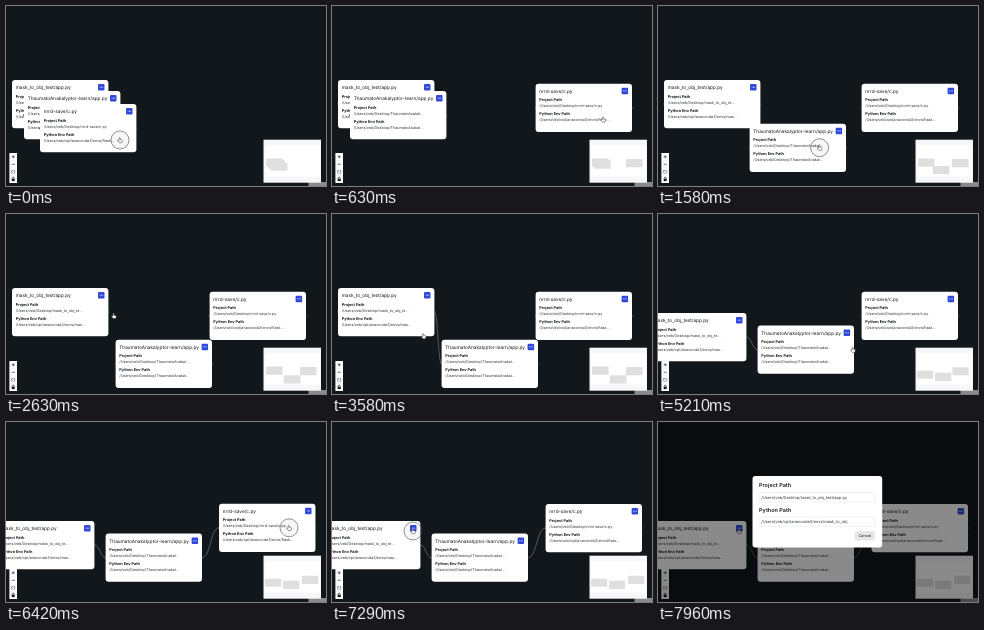
Recreate the animation shown at these times as an HTML page. Size 320x180 px, loop 8000 ms.

```html
<!DOCTYPE html>
<html lang="en">
<head>
<meta charset="utf-8">
<title>Flow editor</title>
<style>
  html, body { margin: 0; width: 100%; height: 100%; overflow: hidden; background: #11171a; }
  svg { display: block; width: 100%; height: 100%; }
  text { font-family: Inter, sans-serif; fill: #15181c; text-rendering: geometricPrecision; }
  .title { font-size: 4.75px; }
  .label { font-size: 3.85px; font-weight: 700; }
  .path { font-size: 3.75px; fill: #33373c; }
  .heading { font-size: 5.5px; font-weight: 600; }
  .edge { fill: none; stroke: #a5a8ad; stroke-width: .45; }
  .handle { fill: #1a192b; stroke: #8b8e93; stroke-width: .25; }
  .input { fill: #fff; stroke: #d8dbe0; stroke-width: .4; }
  .icon { fill: none; stroke: #15181c; stroke-width: .6; }
</style>
</head>
<body>
<svg viewBox="0 0 320 180">
  <rect width="320" height="180" fill="#11171a"/>
  <g id="edges"></g>
  <g id="cards"></g>

  <g transform="translate(3.4 147)">
    <rect width="7.6" height="30" fill="#fefefe"/>
    <path d="M0 7.5h7.6M0 15h7.6M0 22.5h7.6" stroke="#ddd" stroke-width=".3"/>
    <path class="icon" d="M2.2 3.8h3.2M3.8 2.2v3.2M2.2 11.3h3.2"/>
    <path class="icon" stroke-dasharray="1.2 .8" d="M2.2 17.5h3.2v2.6h-3.2z"/>
    <path class="icon" d="M2.8 26v-1a1 1 0 0 1 2 0v1"/>
    <rect x="2.3" y="25.8" width="3" height="2.3" fill="#15181c"/>
  </g>

  <rect x="257.5" y="133.7" width="57.5" height="43" fill="#f7f7f7"/>
  <rect x="259" y="139.6" width="55" height="31" fill="#fff"/>
  <g id="minimap" fill="#dfdfdf"></g>
  <rect x="302.5" y="176" width="17.5" height="4" fill="#fff" opacity=".5"/>
  <text x="303.5" y="179.2" font-size="3" style="fill:#888">React Flow</text>

  <g id="cursor">
    <circle id="ring" r="9" fill="#000" fill-opacity=".03" stroke="#45494d" stroke-width=".6"/>
    <path d="M-.9 -2.2q.6-.7 1.1 0v1.7l1.7.4q.7.2.5 1l-.5 1.8h-2.7l-1.5-2q-.3-.8.5-.6l.9.5z"
          fill="#fff" stroke="#222" stroke-width=".45"/>
  </g>

  <g id="modal">
    <rect id="shade" width="320" height="180" fill="#000"/>
    <g id="dialog">
      <rect x="94.5" y="54" width="129.7" height="71.5" rx="3" fill="#fff"/>
      <g id="fields"></g>
      <rect x="196.7" y="109" width="20.3" height="9.5" rx="1.3" fill="#e6e7e9"/>
      <text x="206.8" y="115.1" font-size="3.8" text-anchor="middle">Cancel</text>
    </g>
  </g>
</svg>
<script>
const LOOP = 8000, CARD_W = 96.4, CARD_H = 48.2;
const INPUT = [0, CARD_H / 2], OUTPUT = [CARD_W, CARD_H / 2], BUTTON = [89, 10], GRIP = [70, 24];

const el = id => document.getElementById(id);
const add = ([x, y], [dx, dy]) => [x + dx, y + dy];
const mix = (a, b, p) => a.map((v, i) => v + (b[i] - v) * p);
// Eased progress of t from start to end
const progress = (t, start, end) => {
  const p = Math.max(0, Math.min(1, (t - start) / (end - start)));
  return p * p * (3 - 2 * p);
};

const cards = [
  ['mask_to_obj_test/app.py', 'Desktop/mask_to_obj_te...', 'opt/anaconda3/envs/mas...'],
  ['ThaumatoAnakalyptor-learn/app.py', 'Desktop/ThaumatoAnakal...', 'Desktop/ThaumatoAnakal...'],
  ['nrrd-save/c.py', 'Desktop/nrrd-save/c.py', 'opt/anaconda3/envs/flask...']
];
const homes = cards.map((_, i) => [6 + 10 * i + 2 * i * i, 74 + 10 * i + i * i]);

// Each gesture presses at `down` and releases at `up`; the pointer glides between gestures.
const resting = [...homes];
function drag(start, end, card, to, grip = GRIP) {
  const from = resting[card];
  resting[card] = to;
  return { start, end, card, to, down: add(from, grip), up: add(to, grip) };
}
const link = (start, end, source, target) => ({
  start, end, source, target,
  down: add(resting[source], OUTPUT), up: add(resting[target], INPUT)
});
function click(start, end, card, spot) {
  const point = add(resting[card], spot);
  return { start, end, down: point, up: point };
}

const gestures = [
  drag(0, 540, 2, [203.6, 77.7], [80, 36]),
  drag(1130, 1760, 1, [109.6, 125.7]),
  link(2800, 3450, 0, 1),
  drag(3700, 4190, 0, [-8, 99]),
  drag(4550, 4930, 1, [99.6, 111.6]),
  link(5250, 5700, 1, 2),
  drag(5950, 6500, 2, [213.6, 82]),
  click(7230, 7480, 0, BUTTON)
];
const links = gestures.filter(g => 'source' in g);

const input = (y, value) => `
  <rect class="input" x="101" y="${y}" width="116" height="9.5" rx="1.3"/>
  <text class="path" x="103.3" y="${y + 6.1}" style="font-size:4px">/Users/veb/${value}</text>`;
el('fields').innerHTML = `
  <text class="heading" x="101" y="65.2">Project Path</text>
  ${input(70.5, 'Desktop/mask_to_obj_test/app.py')}
  <text class="heading" x="101" y="89.7">Python Path</text>
  ${input(95, 'opt/anaconda3/envs/mask_to_obj')}`;

el('cards').innerHTML = cards.map(([title, project, python]) => `<g>
  <circle class="handle" cy="${CARD_H / 2}" r=".9"/>
  <circle class="handle" cx="${CARD_W}" cy="${CARD_H / 2}" r=".9"/>
  <rect width="${CARD_W}" height="${CARD_H}" rx="3" fill="#fff"/>
  <text class="title" x="3.7" y="9.4">${title}</text>
  <rect x="86" y="4" width="6.5" height="6.5" rx="1" fill="#3049d9"/>
  <path d="M87.7 7.2h3.4" stroke="#fff" stroke-width=".8" stroke-dasharray=".8 .5"/>
  <text class="label" x="3.7" y="17.7">Project Path</text>
  <text class="path" x="3.7" y="23.7">/Users/veb/${project}</text>
  <text class="label" x="3.7" y="31.7">Python Env Path</text>
  <text class="path" x="3.7" y="37.7">/Users/veb/${python}</text>
</g>`).join('');
el('minimap').innerHTML = '<rect/>'.repeat(cards.length);
el('edges').innerHTML = '<path class="edge"/>'.repeat(links.length);

const cardAt = (card, t) => gestures.filter(g => g.card === card)
  .reduce((spot, g) => mix(spot, g.to, progress(t, g.start, g.end)), homes[card]);

function pointerAt(t) {
  const i = gestures.findLastIndex(g => g.start <= t);
  const { start, end, down, up } = gestures[i], next = gestures[i + 1];
  if (t < end) return mix(down, up, progress(t, start, end));
  return next ? mix(up, next.down, progress(t, end, next.start)) : up;
}

function drawMinimap(spots) {
  const left = Math.min(0, ...spots.map(s => s[0]));
  const scale = 55 / (320 - left);
  spots.forEach(([x, y], i) => {
    const box = { x: 259 + (x - left) * scale, y: 155.2 + (y - 90) * scale,
      width: CARD_W * scale, height: CARD_H * scale, rx: .5 };
    for (const key in box) el('minimap').children[i].setAttribute(key, box[key]);
  });
}

function drawLinks(t, spots, pointer) {
  links.forEach(({ start, end, source, target }, i) => {
    const [x0, y0] = add(spots[source], OUTPUT);
    const [x1, y1] = t < end ? pointer : add(spots[target], INPUT);
    const mid = (x0 + x1) / 2;
    el('edges').children[i].setAttribute('d',
      t < start ? '' : `M${x0} ${y0}C${mid} ${y0} ${mid} ${y1} ${x1} ${y1}`);
  });
}

function draw(t) {
  const spots = cards.map((_, i) => cardAt(i, t)), pointer = pointerAt(t);
  spots.forEach((s, i) => el('cards').children[i].setAttribute('transform', `translate(${s})`));
  drawMinimap(spots);
  drawLinks(t, spots, pointer);

  el('cursor').setAttribute('transform', `translate(${pointer})`);
  const pressed = gestures.some(g => t >= g.start && t < g.end);
  el('ring').setAttribute('visibility', pressed ? 'visible' : 'hidden');

  const open = progress(t, 7540, 7740), zoom = .95 + .05 * open;
  el('modal').setAttribute('visibility', open ? 'visible' : 'hidden');
  el('shade').setAttribute('opacity', .46 * open);
  el('dialog').setAttribute('opacity', open);
  el('dialog').setAttribute('transform', `translate(160 90) scale(${zoom}) translate(-160 -90)`);
}

const begin = performance.now();
function tick() {
  draw(Math.max(0, performance.now() - begin) % LOOP);
  requestAnimationFrame(tick);
}
tick();
</script>
</body>
</html>
```
